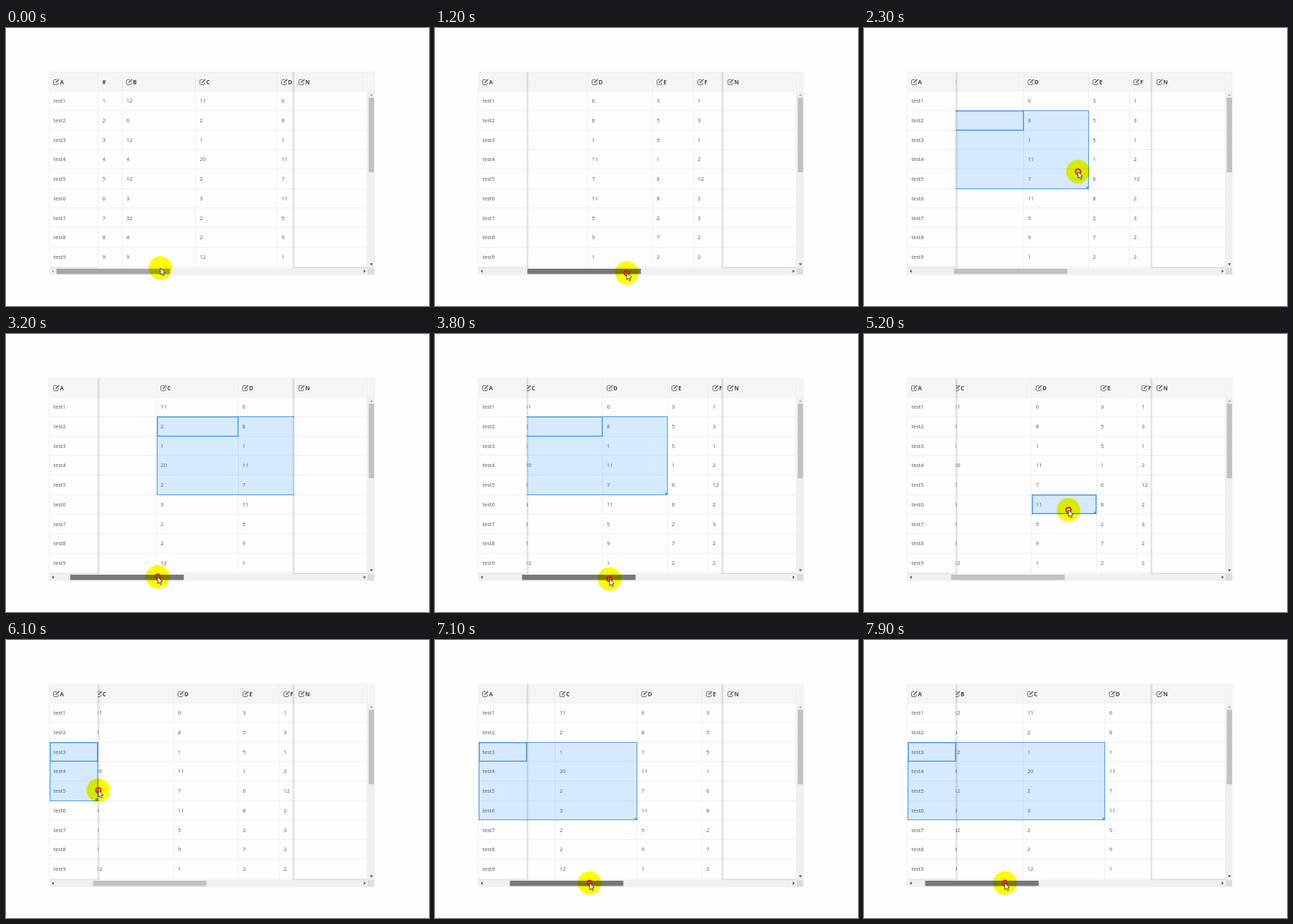
Write an HTML page with a canvas that moves like this. It is 600 by 395 pixels and loops after 8000 ms.

```html
<!DOCTYPE html>
<html>
<head>
<meta charset="utf-8">
<style>
html, body { margin: 0; width: 100%; height: 100%; overflow: hidden; background: #fefdff; }
canvas { display: block; }
</style>
</head>
<body>
<canvas width="600" height="395"></canvas>
<script>
const g = document.querySelector('canvas').getContext('2d');
const LEFT = 62, TOP = 62, BODY = 90, BOTTOM = 341, FIXED = 130, LAST = 409, RIGHT = 513, EDGE = 523;
const HEIGHT = BOTTOM - TOP, ROW = 27.7, THUMB = 71.5, RATIO = 2.825;
const BG = '#fefdff', HEAD = '#f6f5f6', BAR = '#f1f0f1', LINE = '#eeedef', TEXT = '#555', BLUE = '#4a98e2';

// Name, width and cell texts; each column starts where the one before ends
let start = LEFT;
const columns = [
  ['A', 69, 'test1 test2 test3 test4 test5 test6 test7 test8 test9'],
  ['#', 34, '1 2 3 4 5 6 7 8 9'],
  ['B', 104, '12 6 12 4 12 3 32 4 9'],
  ['C', 116, '11 2 1 20 2 3 2 2 12'],
  ['D', 92, '6 8 1 11 7 11 5 9 1'],
  ['E', 58, '3 5 5 1 6 8 2 7 2'],
  ['F', 75, '1 3 1 2 12 2 3 2 2'],
  ['', 0, '']
].map(([name, width, text]) => ({ name, left: (start += width) - width, cells: text.split(' ') }));

// Key points of the pointer: time, x, y
const path = [
  [0, 219, 341], [200, 212.5, 347], [900, 275.5, 348], [1500, 268.5, 348],
  [1900, 190, 132], [2100, 340, 200], [2300, 303.5, 204],
  [2800, 251.5, 345], [3300, 206, 345], [3800, 247.5, 348],
  [4100, 285, 242], [4300, 230, 180.5], [4700, 350, 165], [5200, 290, 250],
  [5700, 105, 158], [6100, 131, 213.5], [6500, 190, 245],
  [6900, 236.5, 345], [7500, 184.5, 346], [8000, 203.5, 345]
];
const scrollDrags = [[200, 1500], [2800, 3800], [6900, 8000]];
const selectDrags = [[1900, 2300], [4100, 5200], [5700, 6500]];

const active = (drags, t) => drags.some(([from, to]) => t >= from && t <= to);

function pointer(t) {
  const i = Math.max(1, path.findIndex(p => p[0] >= t));
  const [t0, x0, y0] = path[i - 1], [t1, x1, y1] = path[i];
  const k = (t - t0) / (t1 - t0);
  return [x0 + (x1 - x0) * k, y0 + (y1 - y0) * k];
}

// The thumb follows the pointer through every drag begun so far
function thumbAt(t) {
  return scrollDrags.filter(d => d[0] <= t).reduce((x, [from, to]) =>
    Math.max(THUMB, x + pointer(Math.min(t, to))[0] - pointer(from)[0]), THUMB);
}

const scrollAt = t => (thumbAt(t) - THUMB) * RATIO;

function cellAt(t) {
  const [x, y] = pointer(t), s = scrollAt(t);
  const col = x < FIXED + 2 ? 0 : columns.findLastIndex(c => c.left <= x + s);
  return [col, Math.floor((y - BODY) / ROW)];
}

const rowY = r => Math.round(BODY - 0.8 + ROW * r);

function rect(x, y, w, h, color) {
  g.fillStyle = color;
  g.fillRect(x, y, w, h);
}

function poly(points, color) {
  g.beginPath();
  points.forEach(p => g.lineTo(...p));
  g.closePath();
  g.fillStyle = color;
  g.fill();
}

function circle(x, y, r) {
  g.beginPath();
  g.arc(x, y, r, 0, 7);
}

function stroke(color, width) {
  g.strokeStyle = color;
  g.lineWidth = width;
  g.stroke();
}

function label(text, x, y, bold) {
  g.font = (bold ? 'bold 8px' : '7.6px') + ' "Open Sans", "Noto Sans", sans-serif';
  g.fillStyle = bold ? '#444' : TEXT;
  g.fillText(text, x, y);
}

function editIcon(x) {
  g.beginPath();
  g.moveTo(x + 5, 73.4);
  g.arcTo(x + 0.5, 73.4, x + 0.5, 77, 1.5);
  g.arcTo(x + 0.5, 80.6, x + 4, 80.6, 1.5);
  g.arcTo(x + 7.2, 80.6, x + 7.2, 77.5, 1.5);
  g.lineTo(x + 7.2, 77.5);
  stroke(TEXT, 0.9);
  g.beginPath();
  g.moveTo(x + 3.4, 77.8);
  g.lineTo(x + 8.3, 73);
  stroke(TEXT, 1.5);
}

function header(name, x) {
  if (!name) return;
  if (name === '#') return label(name, x + 5.5, 79.5, true);
  editIcon(x + 5.5);
  label(name, x + 15, 79.5, true);
}

function column({ name, cells }, x) {
  rect(Math.round(x) - 1, TOP, 1, HEIGHT, LINE);
  header(name, x);
  cells.forEach((v, r) => label(v, x + 5.7, 106.3 + ROW * r));
}

function frameBox(l, t, r, b, width) {
  const inset = width / 2;
  g.strokeStyle = BLUE;
  g.lineWidth = width;
  g.strokeRect(l + inset, t + inset, r - l - width, b - t - width);
}

function selection(t, colX, fixed) {
  const drag = selectDrags.findLast(d => d[0] <= t);
  if (!drag) return;
  const a = cellAt(drag[0]), b = cellAt(Math.min(t, drag[1]));
  if (fixed && a[0] && b[0]) return;
  const box = (p, q) => {
    const c1 = Math.max(p[0], q[0]);
    return [
      Math.round(colX(Math.min(p[0], q[0]))), rowY(Math.min(p[1], q[1])),
      c1 ? Math.round(colX(c1 + 1)) : FIXED + 0.5, rowY(Math.max(p[1], q[1]) + 1) + 1
    ];
  };
  const [l, u, r, d] = box(a, b);
  rect(l, u, r - l, d - u, 'rgba(12,136,246,.17)');
  frameBox(l, u, r, d, 1);
  frameBox(...box(a, a), 1.5);
  rect(r - 3.5, d - 3.5, 3.5, 3.5, BLUE);
}

function pane(x, w, draw) {
  g.save();
  g.beginPath();
  g.rect(x, TOP, w, HEIGHT);
  g.clip();
  rect(x, TOP, w, HEIGHT, BG);
  rect(x, TOP, w, BODY - TOP, HEAD);
  rect(x, TOP, w, 1, LINE);
  for (let r = 0; r < 10; r++) rect(x, rowY(r), w, 1, LINE);
  draw();
  g.restore();
}

function shadow(from, to) {
  const fade = g.createLinearGradient(from, 0, to, 0);
  fade.addColorStop(0, 'rgba(0,0,0,.15)');
  fade.addColorStop(1, 'rgba(0,0,0,0)');
  rect(Math.min(from, to), TOP, Math.abs(to - from), HEIGHT, fade);
}

function scrollbars(thumb, color) {
  const dark = '#444', pale = '#a8a8a8';
  rect(RIGHT, TOP, EDGE - RIGHT, BODY - TOP, HEAD);
  rect(RIGHT, BODY, EDGE - RIGHT, BOTTOM - BODY, BAR);
  rect(514.5, 99, 7.5, 106, '#c1c1c1');
  poly([[516, 96.5], [518.3, 93.8], [520.6, 96.5]], pale);
  poly([[516, 334.5], [518.3, 337.2], [520.6, 334.5]], dark);
  rect(LEFT, BOTTOM, RIGHT - LEFT, 9, BAR);
  rect(RIGHT, BOTTOM, EDGE - RIGHT, 9, '#dcdcdc');
  rect(thumb, 342, 161, 7.5, color);
  poly([[67.5, 343.2], [65, 345.6], [67.5, 348]], thumb > THUMB ? dark : pale);
  poly([[507.5, 343.2], [510, 345.6], [507.5, 348]], dark);
}

function drawPointer(x, y, down) {
  g.globalCompositeOperation = 'multiply';
  circle(x, y, 16.7);
  g.fillStyle = '#ff0';
  g.fill();
  g.globalCompositeOperation = 'source-over';
  if (down) {
    circle(x, y, 3.6);
    stroke('#e8140c', 2);
  }
  const arrow = [[0, 0], [0, 9.5], [2.2, 7.6], [3.8, 11], [5.4, 10.3], [3.9, 7], [6.7, 6.8]];
  poly(arrow.map(([a, b]) => [x + a, y + b]), '#fff');
  stroke('#222', 0.8);
}

function draw(t) {
  const scroll = scrollAt(t), [px, py] = pointer(t);
  const dragging = active(scrollDrags, t);
  const colX = i => i ? columns[i].left - scroll : LEFT;
  rect(0, 0, 600, 395, BG);
  pane(FIXED, LAST - FIXED, () => {
    columns.slice(1).forEach((c, i) => column(c, colX(i + 1)));
    selection(t, colX);
  });
  pane(LEFT, FIXED - LEFT, () => {
    column(columns[0], LEFT - 0.5);
    rect(LEFT, BOTTOM - 1, FIXED - LEFT, 1, '#e2e1e3');
    selection(t, colX, true);
  });
  pane(LAST, RIGHT - LAST, () => {
    header('N', LAST + 0.5);
    rect(RIGHT - 1, TOP, 1, HEIGHT, LINE);
    rect(LAST, BOTTOM - 1, RIGHT - LAST, 1, '#d8d7d9');
  });
  if (scroll > 0) shadow(FIXED, FIXED + 4);
  shadow(LAST, LAST - 4);
  scrollbars(thumbAt(t), dragging ? '#787878' : py >= BOTTOM ? '#a6a6a6' : '#c1c1c1');
  g.strokeStyle = LINE;
  g.lineWidth = 1;
  g.strokeRect(LEFT - 0.5, TOP + 0.5, EDGE - LEFT, 288);
  drawPointer(px, py, dragging || active(selectDrags, t));
}

// The picture steps ten times a second
function frame(now) {
  draw(Math.floor(now % 8000 / 100) * 100);
  requestAnimationFrame(frame);
}
requestAnimationFrame(frame);
</script>
</body>
</html>
```
